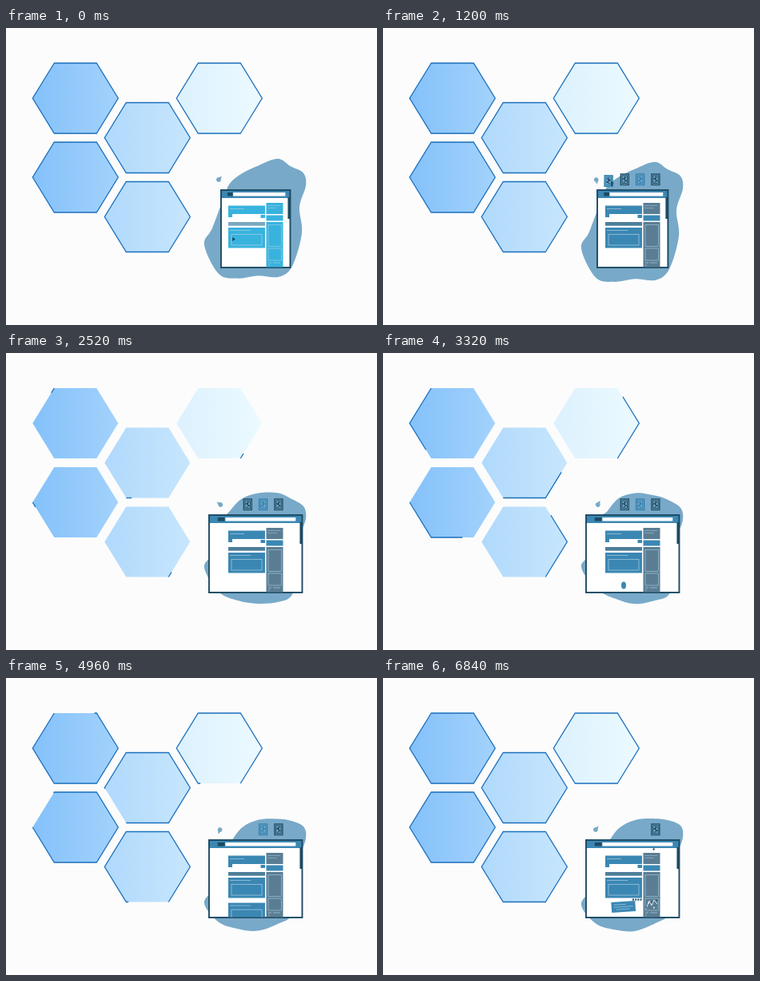
These frames come from a looping animation (464 px wide and 372 px high, 6880 ms). An HTML page:

```html
<!DOCTYPE html>
<html lang="en">
<head>
<meta charset="utf-8">
<title>Page builder</title>
<style>
  html, body { margin: 0; width: 100%; height: 100%; overflow: hidden; background: #fcfcfc; }
  svg { display: block; }
</style>
</head>
<body>
<svg width="464" height="372" viewBox="0 0 464 372">
  <defs>
    <clipPath id="pane"><rect x="255" y="203" width="114" height="96.5"/></clipPath>
  </defs>
  <g id="hexes"></g>
  <g id="scene"></g>
</svg>
<script>
const LOOP = 6880;
const BLOB = '#78a9c9', DARK = '#1d4a62', BLUE = '#3b87b3', PALE = '#a9cfe4';
const hexes = document.getElementById('hexes');
const scene = document.getElementById('scene');

const clamp = x => Math.max(0, Math.min(1, x));
const span = (t, a, b) => clamp((t - a) / (b - a));
const lerp = (a, b, p) => a + (b - a) * p;
const smooth = p => p * p * (3 - 2 * p);
const cubic = p => p < .5 ? 4 * p ** 3 : 1 - 4 * (1 - p) ** 3;
const pulse = (t, a, b, fade) => span(t, a, a + fade) * (1 - span(t, b - fade, b));
const mix = (a, b, p) => `rgb(${a.map((v, i) => Math.round(lerp(v, b[i], p)))})`;
const n = v => v.toFixed(2);

const rect = (x, y, w, h, fill, extra = '') =>
  `<rect x="${n(x)}" y="${n(y)}" width="${n(w)}" height="${n(h)}" fill="${fill}" ${extra}/>`;
const frame = (x, y, w, h, color, width = .7) =>
  rect(x, y, w, h, 'none', `stroke="${color}" stroke-width="${width}"`);
const dot = (x, y, r, fill) => `<circle cx="${n(x)}" cy="${n(y)}" r="${r}" fill="${fill}"/>`;
const line = (d, color, width = .7, extra = '') =>
  `<path d="${d}" fill="none" stroke="${color}" stroke-width="${width}" ${extra}/>`;
const group = (transform, body, opacity = 1) =>
  `<g transform="${transform}" opacity="${n(opacity)}">${body}</g>`;

// Honeycomb: column, half-row and the corner where the outline starts.
const CORNERS = [[27, 0], [0, 44], [27, 88], [80, 88], [107, 44], [80, 0]];
const CELLS = [[0, 0, 0], [1, 1, 2], [2, 0, 3], [0, 2, 1], [1, 3, 3]];

const outlines = CELLS.map(([col, row, start]) => {
  const points = CORNERS.map((_, i) => {
    const [x, y] = CORNERS[(i + start) % 6];
    return `${33.3 + col * 90 + x},${44 + row * 49.5 + y}`;
  }).join(' ');
  const shade = p => mix([132, 193, 250], [234, 249, 255], p);
  hexes.insertAdjacentHTML('beforeend',
    `<linearGradient id="sky${col}${row}">
       <stop stop-color="${shade(col * .43)}"/>
       <stop offset="1" stop-color="${shade(.3 + col * .36)}"/>
     </linearGradient>
     <polygon points="${points}" fill="url(#sky${col}${row})"/>
     <polygon points="${points}" fill="none" stroke="#1a6fbd" stroke-width="1.3" pathLength="1"/>`);
  return hexes.lastElementChild;
});

function drawOutlines(t) {
  const p = t < 1480 ? 1 : span(t, 2455, 5440);
  for (const o of outlines) {
    o.style.display = p > 0 ? '' : 'none';
    o.setAttribute('stroke-dasharray', p < 1 ? `${p} 2` : 'none');
  }
}

function closedCurve(pts) {
  const at = i => pts[(i + pts.length) % pts.length];
  return pts.reduce((d, p, i) => {
    const [a, q, b] = [at(i - 1), at(i + 1), at(i + 2)];
    const c1 = p.map((v, k) => n(v + (q[k] - a[k]) / 6));
    const c2 = q.map((v, k) => n(v - (b[k] - p[k]) / 6));
    return d + `C${c1} ${c2} ${q.map(n)}`;
  }, `M${pts[0].map(n)}`) + 'Z';
}

// Blob outline: x, early y, late y. It sinks, settles and sways.
const SHAPE = [
  [280, 194, 205], [295, 183, 186], [316, 175, 177], [340, 169, 177],
  [356, 180, 180], [372, 190, 188], [375, 206, 203], [367, 232, 230],
  [370, 265, 265], [358, 305, 298], [341, 317, 308], [315, 313, 316],
  [290, 314, 312.5], [266, 306, 303], [248, 268, 279], [258, 248, 260],
  [272, 212, 215]
];
function blob(t) {
  const settle = smooth(span(t, 1200, 3320));
  const sway = .13 * Math.cos((t - 3320) / 2680 * Math.PI);
  const lift = 4 * (1 - span(t, 0, 1200));
  const pts = SHAPE.map(([x, early, late]) =>
    [x, lerp(early, late, settle) + sway * (x - 328) - lift]);
  return `<path d="${closedCurve(pts)}" fill="${BLOB}"/>`;
}

function drop(t) {
  const turn = t / LOOP * 720 - 48;
  const body = dot(0, 0, 2.8, BLOB) + `<path d="M0 -2.6L6 0L0 2.6Z" fill="${BLOB}"/>`;
  const x = 267.3 - 1.4 * Math.cos(t / LOOP * 2 * Math.PI);
  return group(`translate(${n(x)} 190) rotate(${n(turn)})`, body);
}

function browser(t) {
  const w = lerp(86.5, 116.5, cubic(span(t, 1000, 1800)));
  const x = 312.2 - w / 2;
  return rect(x, 203, w, 97, '#fff') +
    rect(x, 203, w, 10, BLUE) +
    rect(x + w * .093, 206, w * .075, 4.5, DARK) +
    rect(x + w * .175, 206, w * .755, 4.5, '#fff') +
    rect(x + w - 3, 212, 3, 27, DARK) +
    frame(x, 203, w, 97, DARK, 1.9);
}

function panel(x, y, w, h, fill) {
  return rect(x, y, w, h, fill) +
    line(`M${x + 2} ${y + 3.5}h26`, PALE) +
    frame(x + 4, y + 8.5, w - 8, 13.5, PALE);
}

function page(t) {
  const p = smooth(span(t, 200, 900));
  const main = mix([56, 179, 222], [59, 135, 179], p);
  const side = mix([56, 179, 222], [91, 125, 147], p);
  const bar = mix([122, 168, 190], [79, 126, 153], p);
  const pointer = `<path d="M283 262v5l4-2.5Z" fill="${DARK}"/>`;
  return rect(278, 222.5, 46, 10.5, main) + line('M280 226.5h18', PALE) +
    rect(278, 233, 5, 4, main) + rect(318.5, 234, 5.5, 4, main) +
    rect(278, 243, 46, 4.7, bar) +
    panel(278, 250, 46, 25.5, main) +
    rect(325.5, 219, 21, 14, side) + line('M327 222.5h16M327 225.5h12', PALE, .5) +
    rect(325.5, 234.5, 21, 7, main) +
    rect(325.5, 243, 21, 56.5, side) +
    frame(328, 246.5, 16.5, 27, PALE, .6) + frame(328, 276, 16.5, 15, PALE, .6) +
    line('M328 294h4M334 294h9M328 297h2', PALE) +
    group('', pointer, 1 - span(t, 300, 800));
}

// Lower panel: grows out of a dot, then tips into a small card.
function lowerPanel(t) {
  const seed = span(t, 3120, 3300);
  const grow = smooth(span(t, 3360, 3800));
  const tip = smooth(span(t, 6000, 6640));
  if (grow < 1) {
    const w = lerp(6, 46, grow) * seed, h = lerp(9, 21, grow) * seed;
    return rect(301 - w / 2, lerp(291, 289.5, grow) - h / 2, w, h, BLUE, `rx="${n(4.5 - grow * 4.5)}"`);
  }
  if (!tip) {
    const y = lerp(279, 283.5, smooth(span(t, 4300, 5500)));
    return `<g clip-path="url(#pane)">${panel(278, y, 46, 26, BLUE)}</g>`;
  }
  const w = lerp(46, 30, tip), h = lerp(16, 13, tip);
  const body = rect(-w / 2, -h / 2, w, h, BLUE) +
    line(`M${3 - w / 2} -3h${w * .5}M${3 - w / 2} 0h${w * .8}M${6 - w / 2} 3h${w * .55}`, PALE);
  return group(`translate(300.7 ${n(lerp(291.5, 286.5, tip))}) rotate(${n(-4 * tip)})`, body);
}

// Icon cards wait in a row; each flight bows left by its swing.
const FLIGHTS = [
  { begin: 1120, x: 278, y: 264, swing: 10 },
  { begin: 3760, x: 278, y: 300, swing: 18 },
  { begin: 5360, x: 327, y: 278, swing: 0 },
  { begin: LOOP, x: 341, y: 190, swing: 0 }
];
function card(i) {
  const color = i % 2 ? DARK : '#2f80ae';
  return rect(-5, -6.8, 10, 13.6, BLOB, `stroke="${color}" stroke-width="1.3"`) +
    frame(-3.2, -4.8, 6.4, 9.6, color, 1) +
    line('M-2 -3L2 -1L-2 1.5L1.5 3.5M0 -4V1', i === 2 ? color : DARK, 1.2,
      `transform="scale(${i % 2 ? -1 : 1} 1)"`);
}
function icons(t) {
  return FLIGHTS.map(({ begin, x, y, swing }, i) => {
    const pop = smooth(span(t, 480 + i * 120, 760 + i * 120));
    const go = span(t, begin, begin + 860);
    const p = smooth(go), bow = Math.sin(Math.PI * p);
    const cx = lerp(283 + i * 19.3, x, p) - swing * bow;
    const cy = lerp(189.7, y, p);
    const trail = i % 2 ? '' : rect(-4.5, -16 * bow - 6, 9, 16 * bow, '#5b9cc4', 'opacity=".65"');
    const turn = swing ? 14 * bow : 0;
    return group(`translate(${n(cx)} ${n(cy)}) rotate(${n(turn)}) scale(${n(pop)})`,
      trail + card(i), 1 - span(go, .75, 1));
  }).join('');
}

const cursor = t => group('',
  `<path d="M285 192l4 2-2 1 1 3-2 0-1-2Z" fill="${DARK}"/>`, pulse(t, 960, 1400, 130));

const arm = t => group('',
  line('M269.5 273.5Q272 277.5 280 277.5T293 279', DARK, 4, 'stroke-linecap="round"') +
  dot(294, 279, 3, DARK) + dot(295, 278.5, .8, BLUE), pulse(t, 5320, 6040, 200));

function chart(t) {
  const p = span(t, 5520, 6500);
  if (!p) return '';
  const marks = [0, 1, 2, 3, 4].filter(i => p > i / 6).map(i =>
    dot(329 + i * 3.3, 283 + Math.sin(i * 2.4 + 1) * 5, .9, i % 2 ? '#fff' : DARK));
  return line('M329 289L333 279L336 285L339 278L343 283', '#e4f0f6', .9,
    `pathLength="1" stroke-dasharray="${n(p)} 2"`) + marks.join('');
}

function finish(t) {
  const buttons = [0, 1, 2, 3].map(i => rect(312 + i * 3.2, 276.5, 2, 2.2, DARK));
  return group('', `<path d="M337 215l2.5-3v4Z" fill="${DARK}"/>` + buttons.join(''),
    span(t, 6400, 6640));
}

const LAYERS = [blob, drop, browser, page, lowerPanel, chart, arm, icons, cursor, finish];
const origin = performance.now();
function tick() {
  const t = (performance.now() - origin) % LOOP;
  drawOutlines(t);
  scene.innerHTML = LAYERS.map(layer => layer(t)).join('');
  requestAnimationFrame(tick);
}
tick();
</script>
</body>
</html>
```
